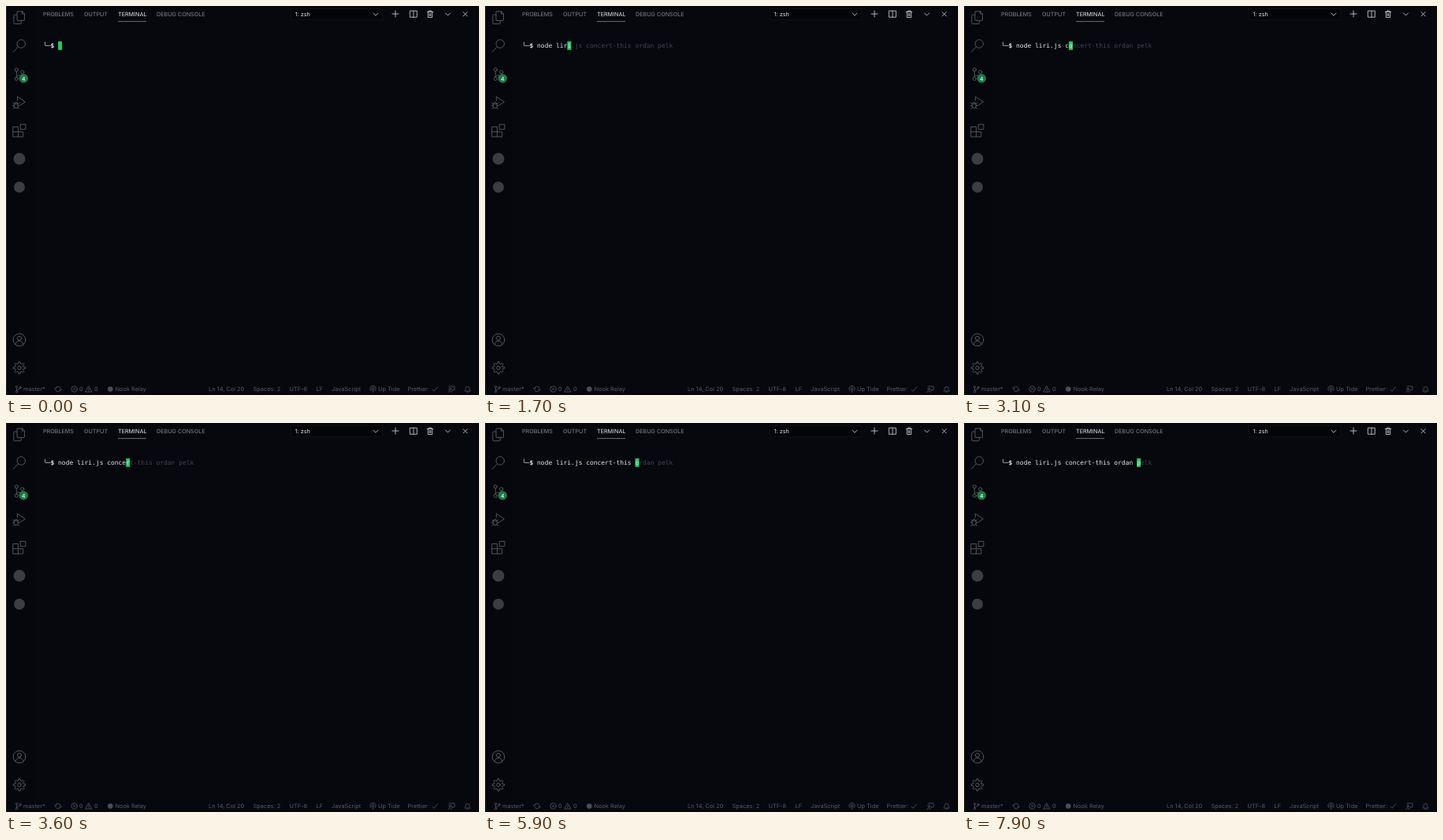
These frames come from a looping animation (600x494 px, 8 s). An HTML page:

```html
<!DOCTYPE html>
<html lang="en">
<head>
<meta charset="utf-8">
<title>Terminal</title>
<style>
html, body { margin: 0; width: 100%; height: 100%; overflow: hidden; background: #07080e; }
svg { display: block; width: 600px; height: 494px; }
text { white-space: pre; text-rendering: geometricPrecision; }
.tabs { font: 7.2px Inter, "Open Sans", sans-serif; fill: #85858c; }
.status { font: 7.4px Inter, "Open Sans", sans-serif; fill: #595968; }
.term { font: 7.95px "DejaVu Sans Mono", monospace; fill: #e4e4e8; }
.line { fill: none; stroke-linecap: round; stroke-linejoin: round; }
.side { stroke: #56565d; stroke-width: 1.4; }
.tool { stroke: #c3c3c8; stroke-width: .9; }
.foot { stroke: #595968; stroke-width: .75; }
</style>
</head>
<body>
<svg viewBox="0 0 600 494">
  <rect width="600" height="494" fill="#07080e"/>
  <rect width="36" height="479" fill="#06070c"/>
  <rect width="1" height="494" fill="#27282e"/>

  <!-- activity bar: each icon on a 24 unit grid -->
  <g class="line side">
    <g transform="translate(8.600 6.400) scale(.7)">
      <path d="M8.500 .75h9l3.750 4.050v11.800l-.6 .6H8.400l-.65-.6V1.500zM17 .75V5.200h4.200M7 6.750H2.500l-.75 .75v15l.75 .75h12l.75-.8V18"/>
    </g>
    <g transform="translate(8.600 42.200) scale(.7)">
      <circle cx="15.250" cy="8.250" r="7.500"/><path d="M9.800 13.600L1 23.200"/>
    </g>
    <g transform="translate(8.600 78.200) scale(.7)">
      <circle cx="6.750" cy="3.750" r="3"/><circle cx="17.300" cy="8.200" r="3"/><circle cx="6.750" cy="20.250" r="3"/>
      <path d="M6.750 6.750v10.500M17.300 11.200c-.3 2-1.500 3-3.300 3h-4c-2 0-3.250 1-3.250 3"/>
    </g>
    <g transform="translate(8.600 114) scale(.7)">
      <path d="M8.250 8.500V1.500L22.500 11.200l-9.300 6.300"/>
      <path d="M2.500 14.500h7v4.500a3.500 3.800 0 0 1-7 0zM3.500 14.500a2.500 2.800 0 0 1 5 0M.5 12.500l2 2M11.500 12.500l-2 2M0 18h2.500M9.500 18H12M.5 23.300l2.300-2M11.500 23.300l-2.300-2"/>
    </g>
    <g transform="translate(8.600 149.800) scale(.7)">
      <path d="M.75 5.250h9v9h9v9h-18zM.75 14.250h9v9M14.250 .75h9v9h-9z"/>
    </g>
    <g transform="translate(8.600 415.600) scale(.7)">
      <circle cx="12" cy="12" r="11.200"/><circle cx="12" cy="9" r="3.700"/>
      <path d="M5 20.400c.4-4.200 3.500-6.300 7-6.300s6.600 2.100 7 6.300"/>
    </g>
    <g transform="translate(8.600 451.100) scale(.7)">
      <path id="gear"/><circle cx="12" cy="12" r="3.200"/>
    </g>
  </g>
  <circle cx="17" cy="194" r="7.500" fill="#3c3c43"/>
  <circle cx="17" cy="230" r="7" fill="#3c3c43"/>
  <circle cx="22.300" cy="92" r="5.700" fill="#1c7a47"/>
  <text x="22.300" y="94.500" text-anchor="middle" font-family="Inter, sans-serif" font-size="6.800" font-weight="600" fill="#e2eee7">4</text>

  <!-- panel header -->
  <g class="tabs">
    <text x="47" y="13.300">PROBLEMS</text>
    <text x="99" y="13.300">OUTPUT</text>
    <text x="142" y="13.300" fill="#e7e7ea">TERMINAL</text>
    <text x="191" y="13.300">DEBUG CONSOLE</text>
    <rect x="142" y="19.300" width="36" height=".8" fill="#85858c"/>
    <rect x="361.500" y="3.500" width="116" height="14" fill="#040509" stroke="#0e0f15"/>
    <text x="366.700" y="13.300" fill="#e4e4e8">1: zsh</text>
  </g>
  <g class="line tool">
    <path d="M466 9.200l3 3 3-3M490 10h8M494 6v8"/>
    <path d="M512.700 6.200h8.600v8h-8.600zM517 6.200v8"/>
    <path d="M534.300 7.500h7.400M536.500 7.500v-1.500h3v1.500M535.300 7.500v7h5.400v-7M537.200 9.500v3.200M538.800 9.500v3.200"/>
    <path d="M557.500 9l3 3 3-3M580 7.700l5.200 5.200M585.200 7.700l-5.200 5.200"/>
  </g>

  <!-- terminal line -->
  <g class="term">
    <text x="47" y="53" font-weight="bold">╰─$</text>
    <text id="typed" x="66.100" y="53"></text>
    <rect id="block" y="45" width="5" height="10.800" fill="#24c865"/>
    <text id="under" y="53" fill="#c9efd6"></text>
    <text id="rest" y="53" fill="#43434e"></text>
  </g>

  <!-- status bar -->
  <g class="line foot">
    <circle cx="13.500" cy="483.700" r="1.200"/><circle cx="18" cy="484.500" r="1.200"/><circle cx="13.500" cy="489.700" r="1.200"/>
    <path d="M13.500 485v3.400M18 485.700c0 1.700-4.500 .8-4.500 2.700"/>
    <path d="M62.700 486a3.300 3.300 0 0 1 6.400-.6M69.300 487a3.300 3.300 0 0 1-6.400 .6M61.300 485l1.400 1.400 1.300-1.400M68 488l1.300-1.400 1.400 1.400"/>
    <circle cx="86.500" cy="486.500" r="3.700"/><path d="M85 485l3 3M88 485l-3 3"/>
    <path d="M105 483l4 7h-8zM105 485.500v2.200M105 488.700v.1"/>
    <path d="M463.300 489a3.700 3.700 0 1 1 4.400 0M464.200 487.200a1.800 1.800 0 1 1 2.600 0M465.500 486v4.500"/>
    <path d="M541 487l2 2.300 4.500-5.500"/>
    <path d="M562 483h7v4.500h-1.500l-1.500 1.500v-1.500M561 490.500c0-2.300 4-2.300 4 0"/><circle cx="563" cy="486.300" r="1.300"/>
    <path d="M582 488.800c1-1 1-1.800 1-3a2.500 2.500 0 0 1 5 0c0 1.200 0 2 1 3zM584.700 490.300h1.600"/>
  </g>
  <circle cx="132.300" cy="486.500" r="3.300" fill="#4d4d5a"/>
  <g class="status">
    <text x="22" y="489.300">master*</text>
    <text x="93" y="489.300">0</text>
    <text x="112" y="489.300">0</text>
    <text x="138.500" y="489.300">Nook Relay</text>
    <text x="257" y="489.300">Ln 14, Col 20</text>
    <text x="313.500" y="489.300">Spaces: 2</text>
    <text x="359.500" y="489.300">UTF-8</text>
    <text x="393.500" y="489.300">LF</text>
    <text x="413" y="489.300">JavaScript</text>
    <text x="472" y="489.300">Up Tide</text>
    <text x="509.500" y="489.300">Prettier:</text>
  </g>
</svg>
<script>
const LOOP = 8000, LEFT = 66.1, ADVANCE = 7.95 * 0.60205;
const COMMAND = "node liri.js concert-this ordan pelk";
// Time of each keystroke in ms
const KEYS = [
  500, 700, 900, 1000, 1200, 1300, 1500, 1700,
  1900, 2200, 2500, 2700, 2900, 3100, 3200, 3400,
  3500, 3600, 3900, 4100, 5000, 5300, 5400, 5500,
  5700, 5900, 6100, 6200, 6400, 6900, 7600, 7900
];
const $ = id => document.getElementById(id);
const typed = $("typed"), block = $("block"), under = $("under"), rest = $("rest");

function gearPath(c, inner, outer, teeth) {
  const pts = [];
  const step = 2 * Math.PI / teeth;
  for (let i = 0; i < teeth; i++) {
    [[-.3, inner], [-.17, outer], [.17, outer], [.3, inner]].forEach(([turn, r]) => {
      const a = (i + turn) * step;
      pts.push((c + r * Math.cos(a)).toFixed(2) + " " + (c + r * Math.sin(a)).toFixed(2));
    });
  }
  return "M" + pts.join("L") + "Z";
}
$("gear").setAttribute("d", gearPath(12, 7.8, 11, 8));

let shown = -1;
function show(count) {
  if (count === shown) return;
  shown = count;
  const x = LEFT + count * ADVANCE;
  typed.textContent = COMMAND.slice(0, count);
  under.textContent = count ? COMMAND[count] : "";
  rest.textContent = count ? COMMAND.slice(count + 1) : "";
  block.setAttribute("x", x);
  under.setAttribute("x", x);
  rest.setAttribute("x", x + ADVANCE);
}

function tick() {
  const t = performance.now() % LOOP;
  show(KEYS.filter(k => k <= t).length);
  requestAnimationFrame(tick);
}
tick();
</script>
</body>
</html>
```
